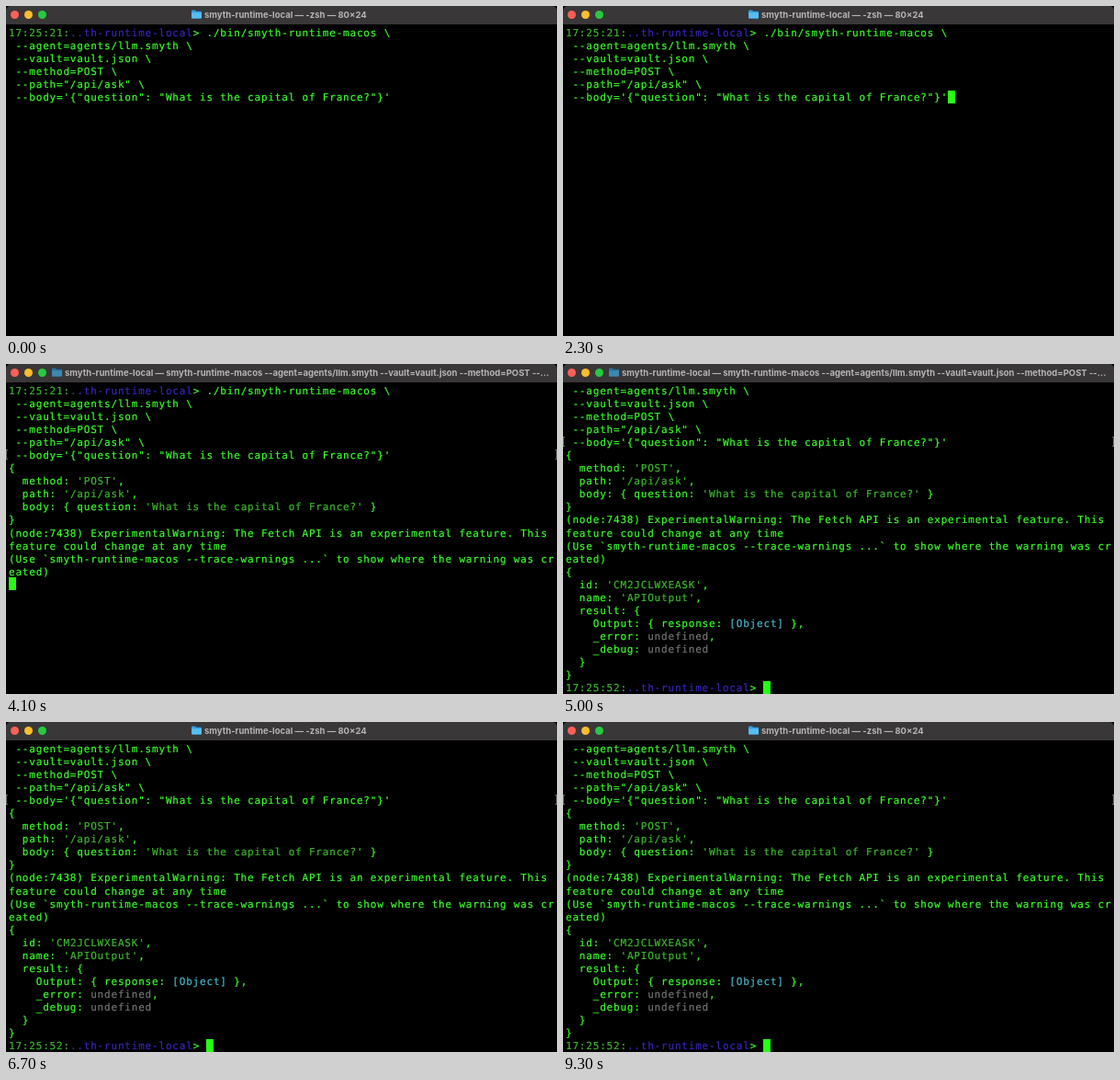
Recreate the animation shown at these times as an HTML page. Size 600 px wide and 359 px high, loop 9400 ms.

```html
<!DOCTYPE html>
<html lang="en">
<head>
<meta charset="utf-8">
<title>Terminal</title>
<style>
html, body { margin: 0; width: 100%; height: 100%; overflow: hidden; background: #000; }
#stage { position: fixed; inset: 0; overflow: hidden; }
#stage > * { position: absolute; }
#bar { left: 0; top: 0; width: 600px; height: 19.6px; border-radius: 5px 5px 0 0; background: #393738; }
#bar i { position: absolute; top: 5px; width: 9px; height: 9px; border-radius: 50%; }
#title { position: absolute; top: 0; font: 700 9.5px/19px Inter, sans-serif; color: #b6b5b6; white-space: nowrap; }
#title svg { position: absolute; left: -14.5px; top: 4px; }
#title.busy svg { filter: brightness(.72); }
#screen {
  left: 3px; top: 23px; margin: 0; color: #3aff2a;
  font: 11px/14.05px "DejaVu Sans Mono", monospace; -webkit-text-stroke: .2px;
  letter-spacing: calc(7.43px - 1ch); text-rendering: geometricPrecision;
}
.green { color: #3cb92c; }
.blue { color: #3626b8; }
.cyan { color: #48b8cc; }
.gray { color: #747474; }
#cursor { width: 7.5px; height: 14px; background: #28fe14; }
.mark { box-sizing: border-box; width: 2px; height: 11px; border: 1px solid #666; }
#open { left: 0; border-right: 0; }
#close { left: 598px; border-left: 0; }
</style>
</head>
<body>
<div id="stage">
  <div id="bar">
    <i style="left:5.4px;background:#ff5f57"></i>
    <i style="left:20.1px;background:#febc2e"></i>
    <i style="left:34.8px;background:#28c840"></i>
    <div id="title">
      <svg width="11" height="10"><path d="M0 1.5Q0 .5 1 .5H4L5 1.7H10Q11 1.7 11 2.7V8.5Q11 9.5 10 9.5H1Q0 9.5 0 8.5Z" fill="#2f9fe0"/><path d="M0 3.2H11V8.5Q11 9.5 10 9.5H1Q0 9.5 0 8.5Z" fill="#56bdf3"/></svg>
      <span id="name"></span>
    </div>
  </div>
  <pre id="screen"></pre>
  <div id="open" class="mark"></div>
  <div id="close" class="mark"></div>
  <div id="cursor"></div>
</div>
<script>
const LOOP = 9400, CELL = 7.43, ROW = 14.05, TOP = 21.7;
const ENTER = 3400, ECHO = 3900, WARN = 4100, DONE = 5000, IDLE = 5100;
const $ = id => document.getElementById(id);
const ink = (cls, text) => `<span class="${cls}">${text}</span>`;
const prompt = time => ink('green', time + ':') + ink('blue', '..th-runtime-local') + '&gt; ';

const command = [
  prompt('17:25:21') + './bin/smyth-runtime-macos \\',
  ' --agent=agents/llm.smyth \\',
  ' --vault=vault.json \\',
  ' --method=POST \\',
  ' --path="/api/ask" \\',
  ` --body='{"question": "What is the capital of France?"}'`
];
const echo = [
  '{',
  `  method: ${ink('green', "'POST'")},`,
  `  path: ${ink('green', "'/api/ask'")},`,
  `  body: { question: ${ink('green', "'What is the capital of France?'")} }`,
  '}'
];
const warning = [
  '(node:7438) ExperimentalWarning: The Fetch API is an experimental feature. This',
  'feature could change at any time',
  '(Use `smyth-runtime-macos --trace-warnings ...` to show where the warning was cr',
  'eated)'
];
const result = [
  '{',
  `  id: ${ink('green', "'CM2JCLWXEASK'")},`,
  `  name: ${ink('green', "'APIOutput'")},`,
  '  result: {',
  `    Output: { response: ${ink('cyan', '[Object]')} },`,
  `    _error: ${ink('gray', 'undefined')},`,
  `    _debug: ${ink('gray', 'undefined')}`,
  '  }',
  '}',
  prompt('17:25:52')
];

const after = (t, start, lines) => t >= start ? lines : [];
let shown = '';

function draw(now) {
  const t = now % LOOP;
  const lines = [...command, ...after(t, ECHO, echo), ...after(t, WARN, warning), ...after(t, DONE, result)];
  const done = t >= DONE, entered = t >= ENTER, busy = entered && t < IDLE;
  const scroll = done ? 1 : 0;

  const html = lines.slice(scroll).join('\n');
  if (html !== shown) $('screen').innerHTML = shown = html;

  $('title').className = busy ? 'busy' : '';
  $('title').style.left = busy ? '64px' : '216px';
  $('name').textContent = 'smyth-runtime-local — ' + (busy
    ? 'smyth-runtime-macos --agent=agents/llm.smyth --vault=vault.json --method=POST --...'
    : '-zsh — 80×24');

  for (const id of ['open', 'close']) {
    $(id).style.top = TOP + (5 - scroll) * ROW + 1.5 + 'px';
    $(id).hidden = !entered;
  }

  // New output keeps the cursor lit for a moment; otherwise it blinks once a second.
  const fresh = [ENTER, ECHO, WARN, DONE].some(s => t >= s && t < s + 300);
  const phase = t % 1000;
  const col = done ? 29 : entered ? 0 : 56;
  const row = done ? 23 : entered ? lines.length : 5;
  const cursor = $('cursor');
  cursor.hidden = !(fresh || phase >= 300 && phase < 800);
  cursor.style.left = 3 + col * CELL + 'px';
  cursor.style.top = TOP + row * ROW + 'px';
}

function tick() {
  draw(performance.now());
  requestAnimationFrame(tick);
}
tick();
</script>
</body>
</html>
```
